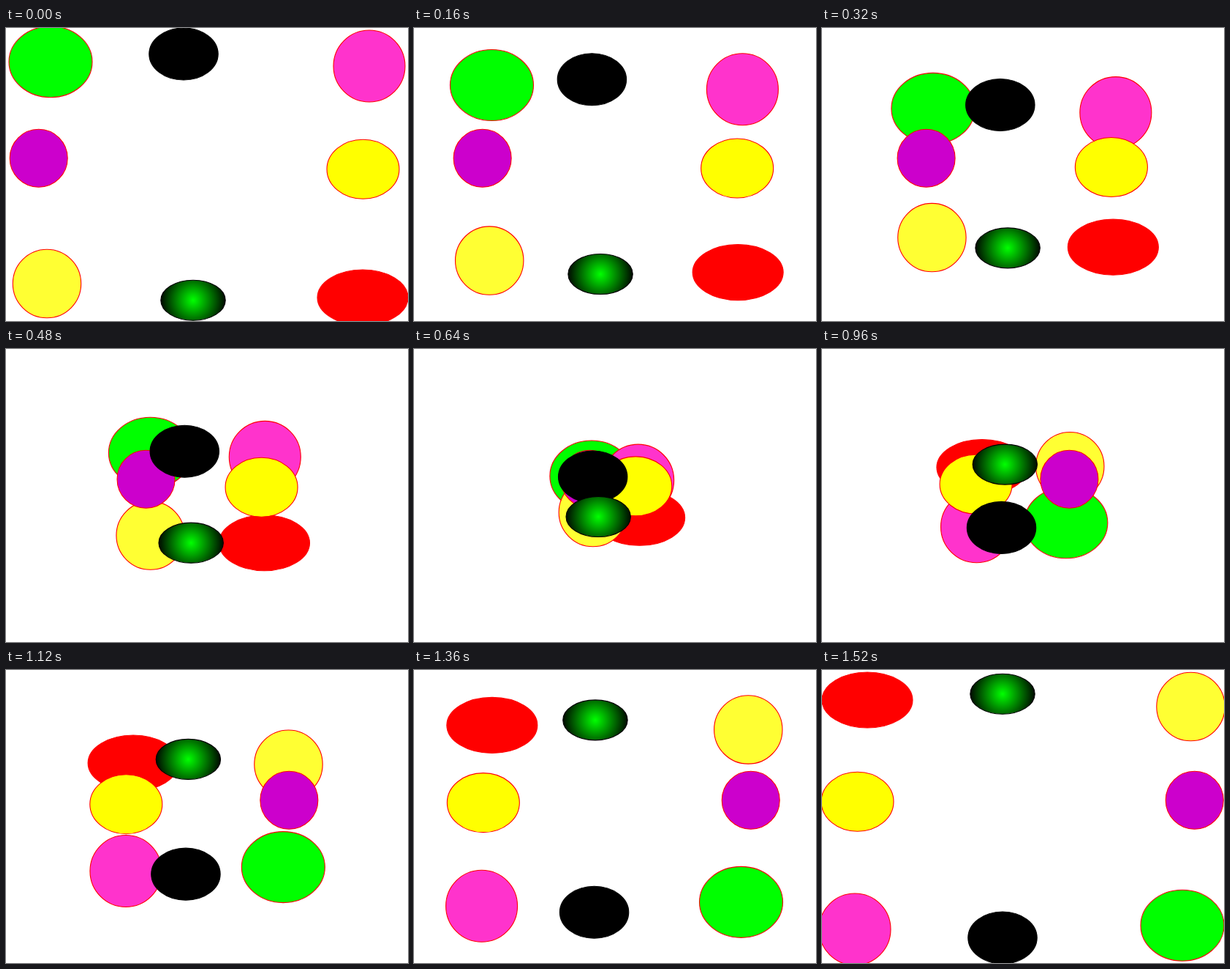
These frames come from a looping animation (550 px wide and 400 px high, 1600 ms). An HTML page with a canvas:

```html
<!DOCTYPE html>
<html lang="en">
<head>
<meta charset="utf-8">
<title>Crossing ellipses</title>
<style>
  html, body { margin: 0; width: 100%; height: 100%; overflow: hidden; background: #fff; }
  canvas { display: block; }
</style>
</head>
<body>
<canvas id="stage" width="550" height="400"></canvas>
<script>
const ctx = document.getElementById('stage').getContext('2d');
const STEP_MS = 80;
const STEPS = 20;

const glow = ctx.createRadialGradient(0, 0, 0, 0, 0, 46);
glow.addColorStop(0, '#00ff00');
glow.addColorStop(1, '#000000');

// Listed from back to front; each travels in a straight line.
const ellipses = [
  { fill: '#00ff00', line: '#ff0000', rx: 57, ry: 48.5, from: [61, 46.2], to: [493, 348.7] },
  { fill: '#ff33cc', line: '#ff0000', rx: 49, ry: 49, from: [497, 52], to: [45, 354] },
  { fill: '#ff0000', line: '#ff0000', rx: 62, ry: 38, from: [488, 368], to: [62, 41] },
  { fill: '#ffff33', line: '#ff0000', rx: 46.7, ry: 46.7, from: [56, 349], to: [504.5, 50] },
  { fill: '#ffff00', line: '#ff0000', rx: 49.5, ry: 40.5, from: [488.5, 192.8], to: [48.5, 179.8] },
  { fill: '#cc00cc', line: '#ff0000', rx: 39.5, ry: 39.5, from: [44.7, 177.7], to: [509.7, 177.7] },
  { fill: '#000000', line: '#000000', rx: 47.2, ry: 35.5, from: [243, 35.5], to: [247, 365.5] },
  { fill: glow, line: '#000000', rx: 44.2, ry: 27.5, from: [256, 371.7], to: [247, 32.7] }
];

const mix = (a, b, t) => a + (b - a) * t;

function drawEllipse({ fill, line, rx, ry, from, to }, t) {
  ctx.save();
  ctx.translate(mix(from[0], to[0], t), mix(from[1], to[1], t));
  ctx.beginPath();
  ctx.ellipse(0, 0, rx, ry, 0, 0, Math.PI * 2);
  ctx.fillStyle = fill;
  ctx.fill();
  ctx.strokeStyle = line;
  ctx.lineWidth = 1.1;
  ctx.stroke();
  ctx.restore();
}

const start = performance.now();

function render() {
  const elapsed = Math.max(0, performance.now() - start);
  const step = Math.floor(elapsed / STEP_MS) % STEPS;
  const t = step / (STEPS - 1);
  ctx.fillStyle = '#ffffff';
  ctx.fillRect(0, 0, 550, 400);
  ellipses.forEach(e => drawEllipse(e, t));
  requestAnimationFrame(render);
}
render();
</script>
</body>
</html>
```
